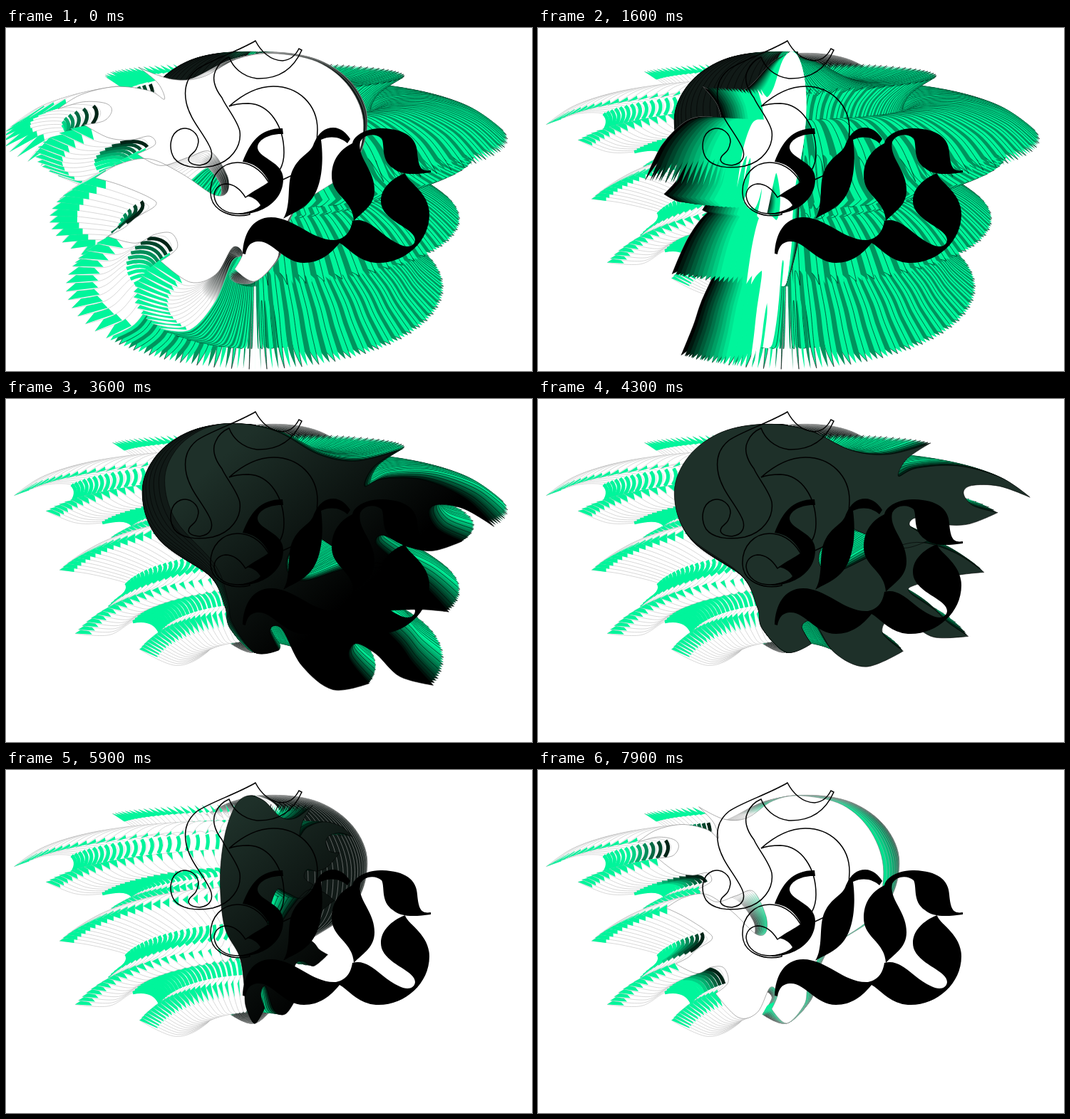
These frames come from a looping animation (738 by 482 pixels, 8 s). An HTML page with a canvas:

```html
<!DOCTYPE html>
<html lang="en">
<head>
<meta charset="utf-8">
<title>Blackletter fan</title>
<style>
  html, body { margin: 0; width: 100%; height: 100%; overflow: hidden; background: #fff; }
  canvas, svg { position: absolute; left: 0; top: 0; width: 738px; height: 482px; }
</style>
</head>
<body>
<canvas id="fan" width="738" height="482"></canvas>
<svg viewBox="0 0 738 482">
  <g fill="#000">
    <path d="M332,188 C343,160 356,141 388,141 L389,149 C368,148 352,158 353,169 C356,184 389,188 389,212 C389,242 362,262 325,262 C340,258 351,256 357,249 C352,240 345,238 338,236 C348,228 360,223 369,216 C362,202 350,190 332,188Z"/>
    <path d="M432,162 C439,146 448,140 459,140 C470,140 478,148 483,156 L479,162 C471,154 456,150 442,157 C446,186 444,226 425,245 C412,258 398,262 389,268 C402,246 392,216 404,196 C414,178 428,176 432,162Z"/>
    <path d="M486,162 C488,150 508,140 528,141 C560,142 576,154 577,175 C579,197 583,202 596,200 L596,203 C574,206 554,207 543,197 C525,185 532,164 527,155 C518,147 502,149 497,160 C492,182 517,198 517,228 C517,250 500,258 488,271 C486,240 457,236 457,208 C457,188 466,172 486,162Z"/>
    <path d="M560,204 C562,216 594,230 594,262 C594,300 560,330 523,330 C495,330 482,310 468,302 C455,318 440,330 418,330 C390,330 375,300 355,300 C342,300 338,308 336,318 L332,317 C333,290 345,266 372,266 C405,266 430,300 463,298 C478,295 484,284 486,271 C510,264 525,292 552,304 C562,309 573,308 574,298 C574,280 526,272 526,243 C526,226 540,212 560,204Z"/>
  </g>
  <g fill="none" stroke="#000" stroke-width="1.5">
    <path d="M350,18 C357,32 371,46 388,46 C400,45 407,37 411,29 L415,31 C404,56 384,72 352,71 C330,68 318,54 313,41 C306,44 298,50 294,60 C289,70 292,84 303,98 C308,110 325,130 328,145 C331,167 315,188 290,194 C268,198 246,196 236,183 C228,170 229,148 245,142 C258,138 270,148 270,160 C268,174 262,175 258,180 C253,187 258,192 272,193 C287,191 293,180 285,165 C275,145 258,128 253,105 C249,86 253,70 268,58 C285,46 325,33 350,18Z"/>
    <path d="M313,110 C330,95 350,82 375,82 C411,82 437,108 437,143 C437,180 420,200 395,210 C370,222 350,228 336,238 C326,222 316,219 308,219 C297,220 292,228 292,236 C294,252 308,261 325,261 C333,261 338,260 342,259 L342,262 C318,268 288,258 287,232 C286,205 305,189 325,189 C344,189 358,200 368,216 C384,206 390,192 390,175 C390,138 370,107 340,106 C326,106 318,108 313,110Z"/>
  </g>
</svg>
<script>
const ctx = document.getElementById('fan').getContext('2d');
const LAST = 91, SUB = 3, AXIS = 349;
const GREEN = [0, 245, 155], DARK = [30, 48, 41], BLACK = [0, 0, 0], WHITE = [255, 255, 255];

// [radius, height, kind]: kind 1 is a sharp tip, 2 a notch
const outline = [
  [-29, 35], [33, 45], [95, 75], [150, 82], [210, 67, 1], [175, 90], [163, 115, 2],
  [190, 104], [250, 103], [313, 124], [355, 157, 1], [310, 137], [270, 134], [258, 145, 2],
  [272, 165], [308, 178, 1], [265, 193], [225, 190], [190, 178, 2], [180, 190], [212, 211, 1],
  [170, 222], [120, 200], [80, 185], [50, 215], [50, 240], [75, 248], [130, 228], [190, 215],
  [245, 235], [288, 269, 1], [245, 270], [190, 278], [179, 288, 2], [215, 318], [235, 340],
  [265, 365, 1], [215, 360], [180, 335], [150, 325, 2], [140, 345], [170, 375, 1], [116, 391],
  [70, 365], [40, 318], [22, 322], [36, 348, 1], [0, 356], [-35, 320], [-42, 290], [-65, 244],
  [-138, 190], [-158, 130], [-138, 80], [-91, 46]
];
const count = outline.length;

// step -> turn in degrees
const turns = [[0, 579], [16, 484], [29, 414], [43, 344], [52, 312], [68, 268], [79, 234], [91, 198]];

const clamp = (v, a = 0, b = 1) => Math.min(b, Math.max(a, v));
const lerp = (a, b, t) => a + (b - a) * t;
const rad = d => d * Math.PI / 180;
const mix = (a, b, t) => a.map((v, i) => Math.round(lerp(v, b[i], clamp(t))));
const css = c => `rgb(${c})`;

function turnAt(u) {
  let i = 1;
  while (i < turns.length - 1 && u > turns[i][0]) i++;
  const [a, x] = turns[i - 1], [b, y] = turns[i];
  return lerp(x, y, (u - a) / (b - a));
}

// the back of the head turns a little out of phase with the tips
function headTurn(turn) {
  const lag = turn < 420 ? 4 + 22 * Math.cos(rad(turn - 205)) : lerp(-14, 24, clamp((turn - 420) / 60));
  return turn - lag;
}

function project(turn, head = headTurn(turn)) {
  return outline.map(([r, y]) => {
    const a = rad(lerp(turn, head, clamp(-r / 90)));
    const tilt = 0.07 + 0.00115 * (y - 50);
    return [AXIS + r * Math.cos(a), y + tilt * r * Math.sin(a)];
  });
}

const at = (p, i) => p[(i + count) % count];

function slope(p, i) {
  if (outline[(i + count) % count][2] === 1) return [0, 0];
  const a = at(p, i - 1), b = at(p, i + 1);
  return [(b[0] - a[0]) / 6, (b[1] - a[1]) / 6];
}

function trace(p) {
  ctx.beginPath();
  ctx.moveTo(...p[0]);
  for (let i = 0; i < count; i++) {
    const a = p[i], b = at(p, i + 1), s = slope(p, i), e = slope(p, i + 1);
    ctx.bezierCurveTo(a[0] + s[0], a[1] + s[1], b[0] - e[0], b[1] - e[1], b[0], b[1]);
  }
  ctx.closePath();
}

function paint(p, fill, line, width) {
  trace(p);
  ctx.fillStyle = fill;
  ctx.fill();
  if (!line) return;
  ctx.strokeStyle = line;
  ctx.lineWidth = width;
  ctx.stroke();
}

function split(turn, head, body, from, to) {
  const c = Math.cos(rad(turn));
  if (Math.abs(c) < 0.1) return css(body);
  const g = ctx.createLinearGradient(AXIS + from * c, 0, AXIS + to * c, 0);
  g.addColorStop(0, css(head));
  g.addColorStop(1, css(body));
  return g;
}

function darkFace(turn) {
  const g = ctx.createLinearGradient(260, 120, 440, 320);
  g.addColorStop(0, css(DARK));
  g.addColorStop(1, css(mix(DARK, BLACK, Math.abs(turn - 344) / 32)));
  return g;
}

// coloured teeth at tips and dark rims inside notches
function trim(p, lag, reach) {
  outline.forEach(([, , kind], i) => {
    if (!kind) return;
    const a = at(p, i - 1), m = p[i], b = at(p, i + 1);
    ctx.beginPath();
    if (kind === 1) {
      const k = q => [lerp(m[0], q[0], reach), lerp(m[1], q[1], reach)];
      ctx.moveTo(...m);
      ctx.lineTo(...k(a));
      ctx.lineTo(...k(b));
      ctx.fillStyle = css(GREEN);
      ctx.fill();
    } else {
      ctx.moveTo(...a);
      ctx.quadraticCurveTo(m[0], m[1], b[0], b[1]);
      ctx.strokeStyle = css(mix(BLACK, GREEN, lag / 7));
      ctx.lineWidth = 5;
      ctx.stroke();
    }
  });
}

function layer(u, step, topTurn) {
  const turn = turnAt(u), lag = u - step, p = project(turn);
  const pale = turn < 272 || turn > 500;
  const darkTop = topTurn > 275 && topTurn < 445;
  const whole = Number.isInteger(u);

  if (lag === 0) {
    paint(p, darkTop ? darkFace(topTurn) : '#fff', darkTop ? '#000' : '#777', 0.6);
    return;
  }
  let head = mix(DARK, BLACK, 0.45);
  if (topTurn < 300) head = mix(GREEN, head, lag / 11);
  else if (darkTop && topTurn < 335 && lag < 8) head = GREEN;

  if (pale) {
    if (!whole) return;
    paint(p, split(turn, head, WHITE, 45, 75), '#b0b0b0', 0.5);
    trim(p, lag, turn > 400 ? 0.9 : 0.5);
    return;
  }
  const phase = Math.round((u - Math.floor(u)) * SUB);
  let body = phase === 2 ? mix(GREEN, BLACK, 0.4) : GREEN;
  if (lag < 5) body = mix(BLACK, GREEN, lag / 5);
  paint(p, split(turn, head, body, -60, 0), whole && '#000', 0.6);
}

// shaded thickness of the face while it sweeps past the front
function sweep(turn) {
  const width = 24 * clamp(1.4 - Math.abs(turn - 484) / 45);
  if (!width || turn < 445) return;
  const n = 18, head = headTurn(turn);
  for (let j = 0; j <= n; j++) {
    const k = j / n;
    const tone = k < 0.6 ? mix(BLACK, GREEN, k / 0.6) : k < 0.9 ? GREEN : WHITE;
    paint(project(turn - width * k, head), css(tone));
  }
}

function draw(step) {
  const top = turnAt(step);
  ctx.fillStyle = '#fff';
  ctx.fillRect(0, 0, 738, 482);
  for (let i = (LAST - step) * SUB; i >= 0; i--) layer(step + i / SUB, step, top);
  sweep(top);
}

let shown = -1;
function tick() {
  const step = Math.floor(performance.now() % 8000 / 100);
  if (step !== shown) draw(shown = step);
  requestAnimationFrame(tick);
}
tick();
</script>
</body>
</html>
```
